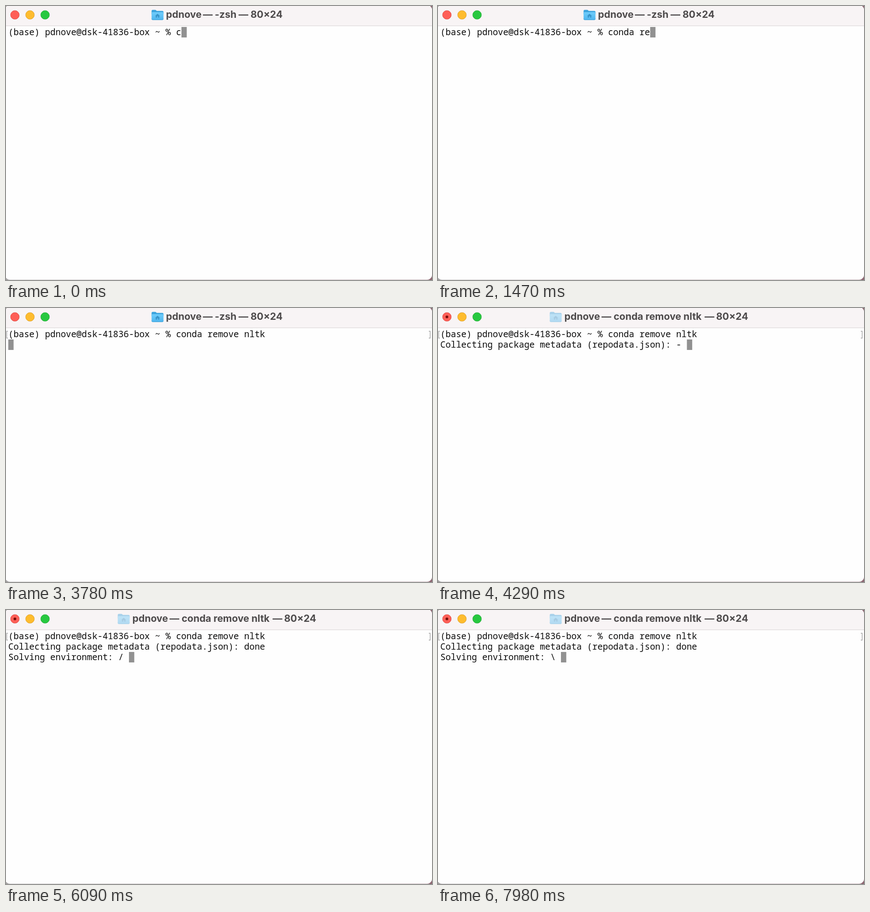
These frames come from a looping animation (932 px wide and 601 px high, 8 s). An HTML page:

```html
<!DOCTYPE html>
<html lang="en">
<head>
<meta charset="utf-8">
<title>Terminal</title>
<style>
  html, body { margin: 0; width: 100%; height: 100%; overflow: hidden; }
  svg { display: block; }
  text { white-space: pre; }
  .line { font: 19.13px "Noto Sans Mono", "DejaVu Sans Mono", monospace; fill: #0c0c0c; }
  .title { font: 700 21.3px Inter, Roboto, sans-serif; fill: #4d4a4b; text-anchor: middle; }
</style>
</head>
<body>
<svg width="932" height="601" viewBox="0 0 932 601">
  <defs>
    <linearGradient id="desk">
      <stop offset="0" stop-color="#a5a3a4"/>
      <stop offset="1" stop-color="#8d6772"/>
    </linearGradient>
    <linearGradient id="front" x2="0" y2="1">
      <stop offset="0" stop-color="#70cdfb"/>
      <stop offset="1" stop-color="#4fb5ee"/>
    </linearGradient>
    <clipPath id="frame"><rect x="-2" y="-2" width="934" height="602.5" rx="11"/></clipPath>
  </defs>
  <rect width="932" height="601" fill="url(#desk)"/>
  <g clip-path="url(#frame)">
    <rect x="-2" y="-2" width="934" height="604" fill="#fefefe"/>
    <rect x="-2" y="-2" width="934" height="45" fill="#f8f4f5"/>
    <rect x="-2" y="43" width="934" height="1" fill="#d6d2d3"/>
  </g>
  <g stroke-width="1">
    <circle cx="19.5" cy="19.5" r="9.5" fill="#fe5f57" stroke="#e24b43"/>
    <circle cx="52.5" cy="19.5" r="9.5" fill="#febc2e" stroke="#e0a028"/>
    <circle cx="85.5" cy="19.5" r="9.5" fill="#28c840" stroke="#24ad36"/>
  </g>
  <circle id="busy" cx="19.5" cy="19.5" r="3" fill="#740c08"/>
  <g id="folder">
    <path d="M0.5 3Q0.5 0.5 3 0.5H8.5Q10 0.5 11 2L11.6 2.8H24Q26.5 2.8 26.5 5.3V10H0.5Z" fill="#3ba3dd"/>
    <rect x="0.5" y="5.5" width="26" height="17" rx="2.2" fill="url(#front)"/>
    <path d="M0.7 20.2Q1 22.2 3 22.2H24Q26 22.2 26.3 20.2" fill="none" stroke="#3c9fd6"/>
    <path d="M13.5 9L18.6 13.4H17.4V17.6H14.7V14.6H12.3V17.6H9.6V13.4H8.4Z" fill="#3894c9"/>
  </g>
  <g id="titles"></g>
  <path id="marks" d="M4 51H1.5V66H4M925 51H928V66H925" fill="none" stroke="#a3a3a3" stroke-width="1.4"/>
  <rect id="cursor" width="11.6" height="23" fill="#919191"/>
  <text class="line" x="5" y="64"></text>
  <text class="line" x="5" y="87"></text>
  <text class="line" x="5" y="110"></text>
</svg>
<script>
const LOOP = 8000, CELL = 11.48, ROW = 23, LEFT = 5, TOP = 46, TICK = 105;
const USER = 'pdnove', COMMAND = 'conda remove nltk';
const PROMPT = `(base) ${USER}@dsk-41836-box ~ % `;
const KEYS = [0, 570, 750, 840, 900, 1050, 1290, 1440, 1590, 1740, 1890, 2040,
              2400, 2550, 2700, 2940, 3120];
const ENTER = 3570, RETITLE = 3870, COLLECT = 4290, DONE = 5700, SOLVE = 5880, SOLVE_SPIN = 5975;

const $ = id => document.getElementById(id);
const rows = [...document.querySelectorAll('.line')];

// Each title: folder position, then words with their centres.
const TITLES = [
  [318, [USER, 389], ['—', 441.5], ['-zsh', 480.5], ['—', 519.5], ['80×24', 570]],
  [244, [USER, 315.5], ['—', 368.5], [COMMAND, 480.5], ['—', 594], ['80×24', 643.5]]
];
const titles = TITLES.map(([, ...words]) => {
  const group = document.createElementNS('http://www.w3.org/2000/svg', 'g');
  group.innerHTML = words.map(([word, x]) => `<text class="title" x="${x}" y="26">${word}</text>`).join('');
  $('titles').append(group);
  return group;
});

const spinner = (t, start) => '/-\\|'[Math.floor((t - start) / TICK) & 3] + ' ';

function screen(t) {
  const lines = [PROMPT + COMMAND.slice(0, KEYS.filter(k => k <= t).length)];
  if (t >= COLLECT) {
    lines.push('Collecting package metadata (repodata.json): ' +
      (t < DONE ? spinner(t, 5160 - 2 * TICK) : 'done'));
  }
  if (t >= SOLVE) {
    lines.push('Solving environment: ' + (t < SOLVE_SPIN ? '' : spinner(t, 6080)));
  } else if (t >= DONE || (t >= ENTER && t < COLLECT)) {
    lines.push('');
  }
  return lines;
}

const show = (el, on) => el.setAttribute('visibility', on ? 'visible' : 'hidden');

function draw(t) {
  const lines = screen(t), last = lines.length - 1, running = t >= RETITLE;
  rows.forEach((row, i) => {
    const text = lines[i] || '';
    if (row.textContent !== text) row.textContent = text;
  });
  $('cursor').setAttribute('x', LEFT + lines[last].length * CELL);
  $('cursor').setAttribute('y', TOP + last * ROW);
  show($('marks'), t >= ENTER);
  show($('busy'), running);
  titles.forEach((group, i) => show(group, i === +running));
  $('folder').setAttribute('transform', `translate(${TITLES[+running][0]} 8)`);
  $('folder').setAttribute('opacity', running ? 0.42 : 1);
}

const start = performance.now();
function frame() {
  draw((performance.now() - start) % LOOP);
  requestAnimationFrame(frame);
}
frame();
</script>
</body>
</html>
```
